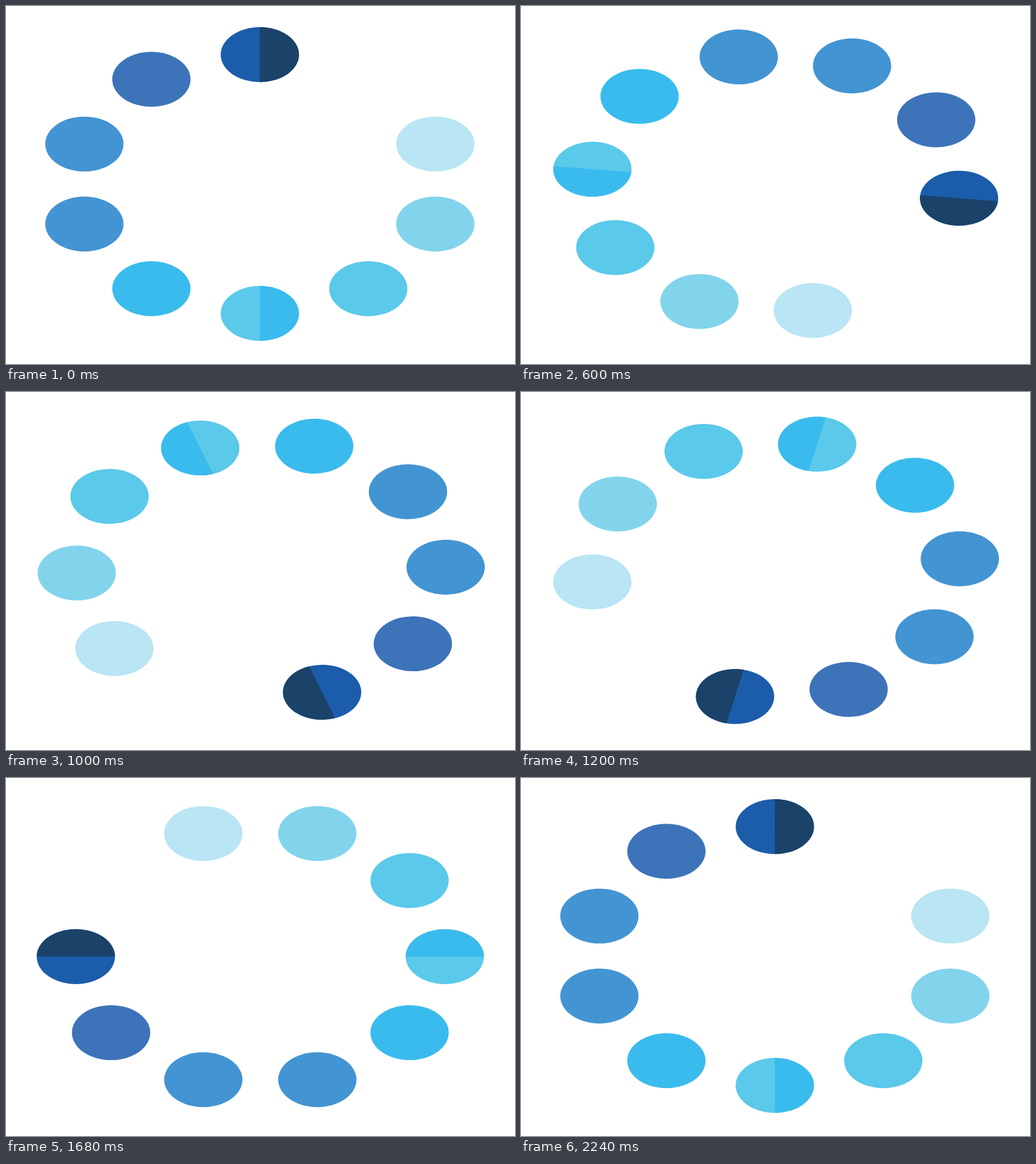
Recreate the animation shown at these times as an HTML page. Size 892 px wide and 627 px high, loop 2.28 s.

```html
<!DOCTYPE html>
<html lang="en">
<head>
<meta charset="utf-8">
<title>Spinner</title>
<style>
  html, body { margin: 0; width: 100%; height: 100%; overflow: hidden; background: #fff; }
  svg { display: block; }
</style>
</head>
<body>
<svg width="892" height="627" viewBox="0 0 892 627">
  <g transform="translate(446 312) scale(1 .701)"><g id="wheel"></g></g>
</svg>
<script>
const RING = 323.3, DOT = 68.6, STEP = 40, STEPS = 56;

// Clockwise from the top: [colour, colour of the right half]; null is the gap
const dots = [
  ['#1b5dab', '#1b4269'], null, ['#b9e5f4'], ['#82d4ec'], ['#5bc9ea'],
  ['#5bc9ea', '#3abbed'], ['#3abbed'], ['#4394d2'], ['#4394d2'], ['#3d73b9']
];

const wheel = document.getElementById('wheel');

wheel.innerHTML = dots.map((dot, i) => {
  if (!dot) return '';
  const [fill, half] = dot, a = i * Math.PI / 5;
  const x = RING * Math.sin(a), y = -RING * Math.cos(a);
  return `<g transform="translate(${x} ${y})"><circle r="${DOT}" fill="${fill}"/>` +
    (half ? `<path d="M0 ${-DOT}A${DOT} ${DOT} 0 0 1 0 ${DOT}z" fill="${half}"/>` : '') + '</g>';
}).join('');

function draw(now) {
  // The last step repeats the first pose; the hub sits slightly off the pivot
  const step = Math.floor(now / STEP) % (STEPS + 1);
  wheel.setAttribute('transform', `rotate(${step / STEPS * 360}) translate(-1.16 -.31)`);
  requestAnimationFrame(draw);
}
draw(0);
</script>
</body>
</html>
```
